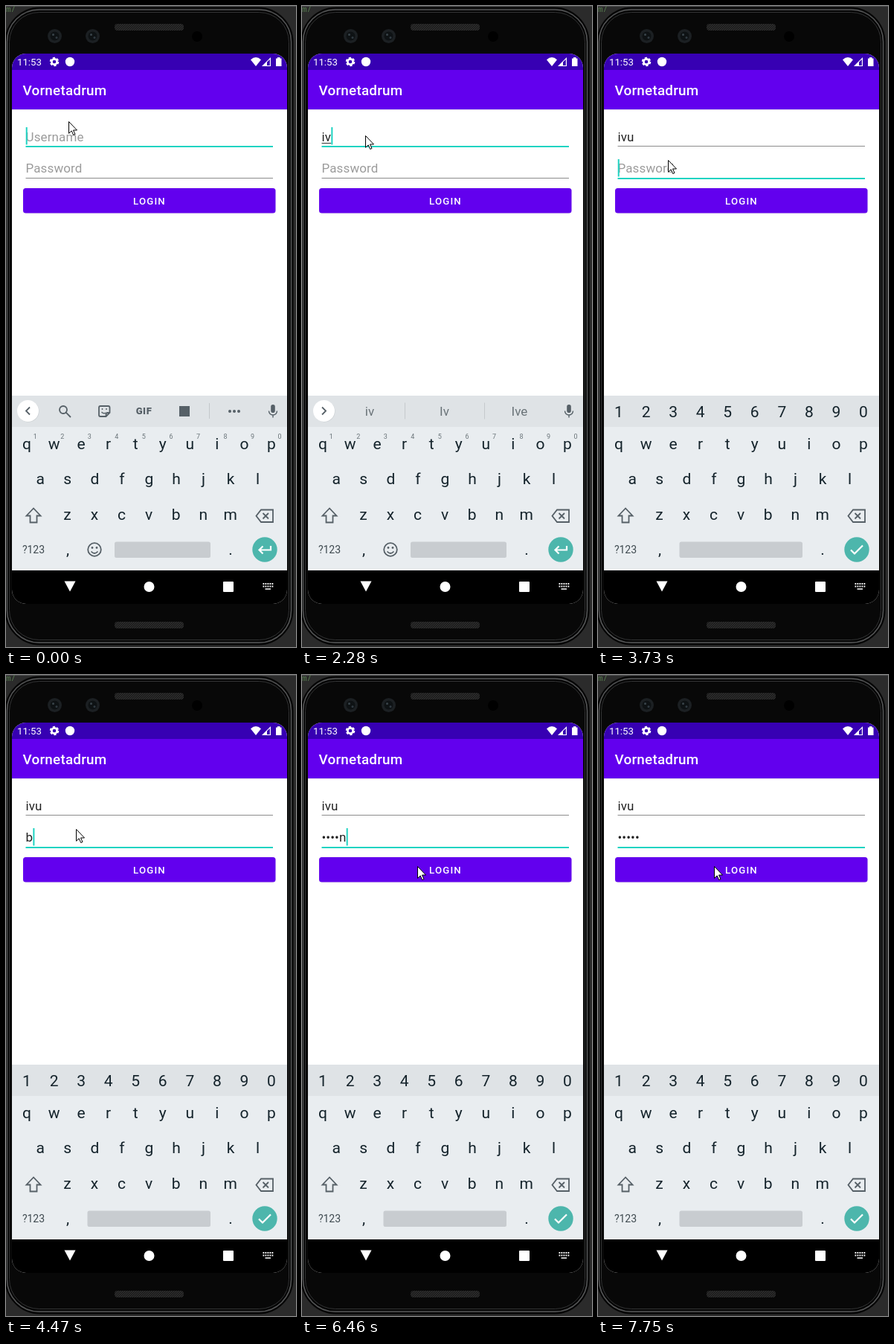
An HTML page for the animation above (8 s loop, 390 by 862 pixels).

```html
<!DOCTYPE html>
<html lang="en">
<head>
<meta charset="utf-8">
<title>Login form</title>
<style>
  html, body { margin: 0; width: 100%; height: 100%; overflow: hidden; background: #2b2b2b; }
  svg { display: block; font-family: Roboto, sans-serif; }
  .mid { text-anchor: middle; }
  .field { font-size: 16.96px; letter-spacing: .15px; fill: #222; white-space: pre; }
  .hint { fill: #9b9b9b; }
  .key { font-size: 21px; fill: #14232b; text-anchor: middle; }
  .small { font-size: 9px; fill: #6a7479; text-anchor: middle; }
  .word { font-size: 17px; fill: #6a7378; text-anchor: middle; }
  .line { fill: none; stroke: #566067; stroke-width: 1.8; }
  .thin { stroke-width: 1.4; }
  .solid { fill: #566067; }
  .white { fill: none; stroke: #fff; stroke-width: 2.2; }
</style>
</head>
<body>
<svg width="390" height="862" viewBox="0 0 390 862">
  <defs>
    <pattern id="mesh" width="3" height="3" patternUnits="userSpaceOnUse">
      <rect width="3" height="3" fill="#2c2c2c"/>
      <path d="M0 3L3 0" stroke="#141414"/>
    </pattern>
    <clipPath id="screen"><rect x="8" y="64" width="370" height="740" rx="19"/></clipPath>
    <filter id="soft" x="-5%" y="-30%" width="110%" height="170%"><feGaussianBlur stdDeviation="1"/></filter>
  </defs>

  <!-- phone body -->
  <rect width="390" height="862" fill="#2b2b2b"/>
  <rect width="390" height="1" fill="#4a4b4c"/>
  <text x="0" y="8" font-size="11" font-family="'Noto Sans Mono', monospace" fill="#56794f">m/</text>
  <rect x="-.5" y="2.5" width="386" height="856" rx="46" fill="#181818" stroke="#050505" stroke-width="2"/>
  <rect x="1.5" y="5" width="382" height="851" rx="43" fill="#050505" stroke="#565758" stroke-width="1.5"/>
  <rect x="4.5" y="8.5" width="376" height="844" rx="40" fill="#080808" stroke="#333435"/>
  <rect x="146" y="24" width="93" height="9" rx="4" fill="url(#mesh)"/>
  <rect x="146" y="828" width="93" height="9" rx="4" fill="url(#mesh)"/>
  <g id="lenses"></g>
  <circle cx="257" cy="41" r="7" fill="#000"/>

  <g clip-path="url(#screen)">
    <rect x="8" y="64" width="370" height="740" fill="#fff"/>
    <rect x="8" y="64" width="370" height="22.5" fill="#3700b3"/>
    <rect x="8" y="86" width="370" height="53" fill="#6200ee"/>
    <rect x="8" y="139" width="370" height="1" fill="#e4e0ea"/>

    <!-- status bar -->
    <text x="15" y="80" font-size="13.2" fill="#fff">11:53</text>
    <g fill="none" stroke="#fff">
      <circle cx="65" cy="75" r="3.6" stroke-width="2.6"/>
      <circle cx="65" cy="75" r="5.3" stroke-width="2" stroke-dasharray="3.1 2.45"/>
    </g>
    <circle cx="86" cy="75" r="6.2" fill="#fff"/>
    <g fill="#fff">
      <path d="M329 72.2Q336 66 343 72.2L336 81Z"/>
      <path d="M344 81L356 69V81Z"/>
      <path d="M351 80V75.5L354.8 71.7V80Z" fill="#3700b3"/>
      <path d="M363 70.5h2v-1.5h3.5v1.5h2V81h-7.5Z"/>
    </g>
    <text x="22.5" y="120" font-size="18.84" font-weight="500" letter-spacing=".24" fill="#fff">Vornetadrum</text>

    <!-- form -->
    <text id="userHint" class="field hint" x="26.5" y="181.5">Username</text>
    <text id="user" class="field" x="26.5" y="181.5"></text>
    <rect id="compose" x="26.5" y="184" height="1" fill="#333"/>
    <rect id="userLine" x="26.5" y="188" width="332.5"/>
    <text id="passHint" class="field hint" x="26.5" y="224">Password</text>
    <text id="pass" class="field" x="26.5" y="224"></text>
    <rect id="passLine" x="26.5" y="231" width="332.5"/>
    <rect id="caret" width="2" height="23.5" fill="#1fd3c2"/>
    <rect id="shade" x="24" y="246" width="337.5" height="33" rx="3.5" fill="#777" filter="url(#soft)"/>
    <rect id="button" x="23" y="245" width="339.5" height="33.5" rx="3.5"/>
    <text class="mid" x="193" y="266.8" font-size="13.19" font-weight="500" letter-spacing="1.18" fill="#fff">LOGIN</text>

    <!-- keyboard -->
    <rect x="8" y="524" width="370" height="235" fill="#e9edf0"/>
    <rect x="8" y="524" width="370" height="42" fill="#dfe3e6"/>
    <g id="keys"></g>
    <g id="hints"></g>
    <g id="digits"></g>
    <g id="topRow">
      <circle cx="30" cy="545" r="14.5" fill="#c9ced1"/>
      <circle cx="29.5" cy="544.5" r="14.5" fill="#fff"/>
      <path id="chevron" class="line"/>
      <rect x="356.2" y="536" width="5.6" height="11" rx="2.8" class="solid"/>
      <path class="line thin" d="M353.5 544.5a5.5 5.5 0 0 0 11 0M359 550v3.5"/>
    </g>
    <g id="tools">
      <path class="line" d="M82 543a5 5 0 1 0-10 0a5 5 0 1 0 10 0M80.7 546.7L87 553"/>
      <path class="line" d="M127 538h10.5q2 0 2 2v7l-5 5H127q-2 0-2-2V540q0-2 2-2ZM134.5 552v-3q0-2 2-2h3"/>
      <path class="line thin" d="M129.5 541v2M135 541v2M128.5 546q3 3 5.5 1"/>
      <text class="mid solid" x="185.5" y="549.2" font-size="13" font-weight="900" letter-spacing=".6">GIF</text>
      <rect x="233" y="538" width="14" height="14" class="solid"/>
      <rect x="273" y="534" width="1" height="21" fill="#c3c8cb"/>
      <path d="M301 545h.01M307 545h.01M313 545h.01" stroke="#566067" stroke-width="4" stroke-linecap="round"/>
    </g>
    <g id="words">
      <path d="M138.5 533.5v22M245.5 533.5v22" stroke="#c5cacd"/>
      <text class="word" x="91" y="551"></text>
      <text class="word" x="191.5" y="551"></text>
      <text class="word" x="292.5" y="551"></text>
    </g>
    <path class="line" d="M37 675.5L27.5 685.5H32.5V694.5H41.5V685.5H46.5Z"/>
    <path class="line" d="M343 677.5H359V694H343L336.5 685.7ZM345.5 682l7.5 7.5M353 682l-7.5 7.5"/>
    <text class="mid" x="37" y="736" font-size="14" fill="#3f4a50">?123</text>
    <text class="key" x="83" y="738">,</text>
    <text class="key" x="302" y="738">.</text>
    <g id="smile">
      <circle cx="119" cy="731" r="8.8" class="line"/>
      <path class="line" d="M114.5 733.5q4.500 5 9 0"/>
      <circle cx="116" cy="728.5" r="1.4" class="solid"/>
      <circle cx="122" cy="728.5" r="1.4" class="solid"/>
    </g>
    <rect id="space" y="720.5" height="21.5" rx="2.5" fill="#c8ccd0"/>
    <circle cx="348" cy="731" r="16.7" fill="#4db6ac"/>
    <path id="enter" class="white"/>

    <!-- navigation bar -->
    <rect x="8" y="759" width="370" height="45" fill="#000"/>
    <g fill="#fff">
      <path d="M78.5 773.5H93.5L86 787.5Z"/>
      <circle cx="192.5" cy="781" r="7"/>
      <rect x="292" y="774" width="14" height="14" rx="1"/>
    </g>
    <path d="M345.5 777h14M345.5 780.5h14" stroke="#fff" stroke-width="1.8" stroke-dasharray="1.8 1.2"/>
    <path d="M348.5 784h7.5" stroke="#fff" stroke-width="1.5"/>
  </g>

  <path id="pointer" d="M.5 .5V16.3L4.2 12.9L6.7 18.5L9 17.5L6.5 12H11.5Z" fill="#fff" stroke="#000"/>
</svg>

<script>
const LOOP = 8000;
const $ = id => document.getElementById(id);
const show = (id, on) => { $(id).style.display = on ? '' : 'none'; };
const set = (id, attrs) => { for (const k in attrs) $(id).setAttribute(k, attrs[k]); };

function row(id, chars, x, y, cls) {
  $(id).innerHTML += [...chars].map((c, i) =>
    `<text class="${cls}" x="${x + i * 36.55}" y="${y}">${c}</text>`).join('');
}
row('keys', 'qwertyuiop', 28, 596, 'key');
row('keys', 'asdfghjkl', 46.2, 643, 'key');
row('keys', 'zxcvbnm', 82.5, 691, 'key');
row('hints', '1234567890', 39.2, 581.5, 'small');
row('digits', '1234567890', 28, 553, 'key');

$('lenses').innerHTML = [65.5, 116.5].map(x =>
  `<circle cx="${x}" cy="40.5" r="9.5" fill="#1c2023"/>
   <circle cx="${x}" cy="40.5" r="6" fill="#0e1214"/>
   <circle cx="${x - 2}" cy="38.5" r="1.5" fill="#3a444a"/>
   <circle cx="${x + 2.5}" cy="42.5" r="1.5" fill="#303a40"/>`).join('');

// Each track lists [start time, value...]
const pointer = [
  [0, 84, 155], [120, 81, 158], [270, 94, 169], [420, 95, 172], [840, 89, 173],
  [970, 85, 173], [1400, 85, 174], [2910, 86, 174], [3050, 89, 188], [3170, 92, 201],
  [3290, 94, 207], [5670, 95, 208], [5800, 96, 210], [5940, 107, 224],
  [6070, 131, 243], [6190, 147, 252], [6340, 152, 256], [6460, 155, 257], [6890, 156, 257]
];
const userText = [[0, ''], [2130, 'i'], [2280, 'iv'], [2440, 'ivu']];
const passText = [[0, ''], [4470, 'b'], [4590, '•a'], [4890, '••o'], [5210, '••••n'], [6770, '•••••']];
const guesses = [[0, '', '', ''], [2280, 'iv', 'Iv', 'Ive'], [2440, 'ivu', 'Ivu', 'Ivun']];
// The caret toggles at each of these times, starting visible
const blinks = [0, 270, 570, 1280, 1830, 2910, 3420, 4030, 4470, 5670, 6190, 6770, 7160, 7750];

const at = (track, t) => track.filter(k => k[0] <= t).pop().slice(1);
const width = id => $(id).textContent ? $(id).getComputedTextLength() : 0;
const underline = (id, focused) =>
  set(id, focused ? { height: 2, fill: '#1fd3c2' } : { height: 1, fill: '#8c8c8c' });

function draw(t) {
  const [user] = at(userText, t), [pass] = at(passText, t), words = at(guesses, t);
  const inPass = t >= 3420, secure = t >= 3730;
  const suggesting = t >= 2280 && !secure, pressed = t >= 6890 && t < 7010;

  $('user').textContent = user;
  $('pass').textContent = pass;
  show('userHint', !user);
  show('passHint', !pass);
  set('compose', { width: t < 3580 ? width('user') : 0 });
  underline('userLine', t < 3580);
  underline('passLine', inPass);
  set('caret', { x: 26.7 + width(inPass ? 'pass' : 'user'), y: inPass ? 206 : 163 });
  show('caret', blinks.filter(b => b <= t).length % 2);

  set('button', { fill: pressed ? '#7722f0' : '#6200ee' });
  set('shade', { y: pressed ? 247 : 245.5, opacity: pressed ? .4 : .25 });

  show('topRow', !secure);
  show('tools', t < 2280);
  show('words', suggesting);
  show('hints', !secure);
  show('digits', secure);
  show('smile', !secure);
  document.querySelectorAll('.word').forEach((el, i) => { el.textContent = words[i]; });
  set('chevron', { d: suggesting ? 'M27 539.5l5 5l-5 5' : 'M32 539.5l-5 5l5 5' });
  set('space', secure ? { x: 109.5, width: 165.5 } : { x: 146, width: 129 });
  set('enter', { d: secure ? 'M340 731.5l5 5l11-11' : 'M356 726v5.5H340.5M345.5 726.5l-5 5l5 5' });
  set('pointer', { transform: `translate(${at(pointer, t)})` });
}

function tick() {
  draw(performance.now() % LOOP);
  requestAnimationFrame(tick);
}
tick();
</script>
</body>
</html>
```
